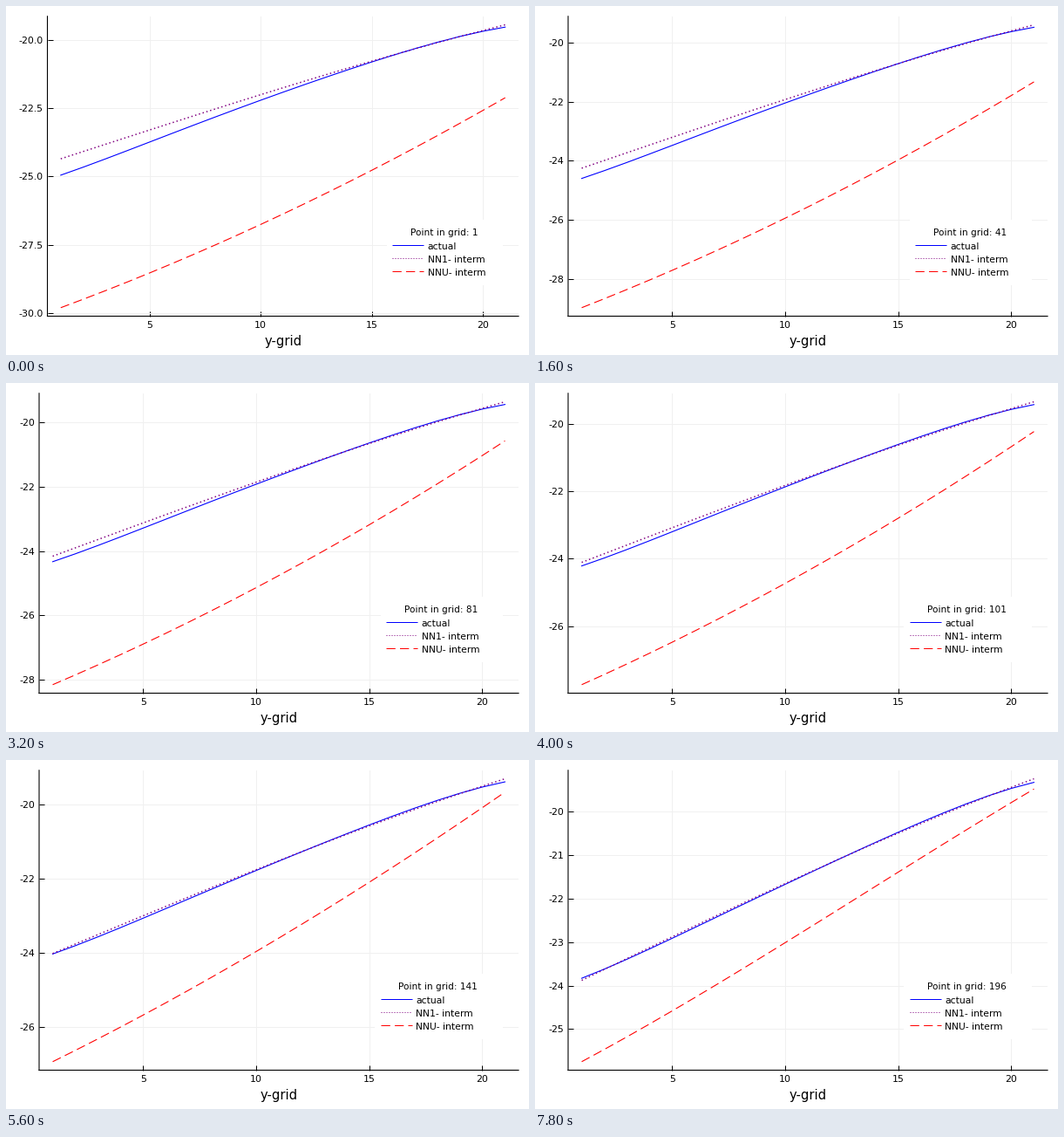
A matplotlib script for the animation above (8 s loop, 600x400 px).

```python
import numpy as np
import matplotlib.pyplot as plt
from matplotlib.animation import FuncAnimation
from matplotlib.patches import Rectangle

W, H, DPI = 600, 400, 100
PX = 72 / DPI                       # one pixel in points
TOP, BOTTOM, RIGHT = 11.8, 355.5, 588
FRAMES, INTERVAL, STEP = 40, 200, 5
GRID = np.arange(1, 22)

plt.rcParams.update({"font.family": "DejaVu Sans", "font.size": 11 * PX,
                     "axes.unicode_minus": False})


def bow(u, start, end, bend):
    """Straight line from start to end, bent between its fixed ends."""
    return start + (end - start) * u + u * (1 - u) * bend


# Each curve takes u = 0..1 along the grid and s = 0..1 through the loop.
def actual(u, s):
    ease, v = 1 - np.exp(-1.2 * s), u - 0.5
    bend = 1.31 - ease + 1.5 * v + 0.73 * v**2 + 4.3 * v**3
    return bow(u, -24.95 + 1.6 * ease, -19.52 + 0.193 * s, bend)


def nn1(u, s):
    return bow(u, -24.35 + 0.47 * s, -19.435 + 0.19 * s, 0.38 + 0.42 * u)


def nnu(u, s):
    late = s**3.3
    start = -29.81 + s * (4.06 - 0.55 * late * (1 - s))
    end = -22.11 + s * (3.81 - 1.18 * late)
    return bow(u, start, end, -1.66 + 1.36 * late + 0.8 * (u - 0.5) * late**2)


def dashes(width, on, off):
    return (0, (on / width, off / width))


# name, colour, curve, chart width and dash, legend width and dash
SERIES = [
    ("actual", "blue", actual, 1.1, "-", 1.0, "-"),
    ("NN1- interm", "purple", nn1, 1.5, dashes(1.5, 1.5, 3), 1.0, dashes(1, 1, 2)),
    ("NNU- interm", "red", nnu, 1.1, dashes(1.1, 10.3, 5.2),
     1.0, dashes(1, 10.3, 5.2)),
]

fig = plt.figure(figsize=(W / DPI, H / DPI), dpi=DPI, facecolor="white")
ax = fig.add_axes([0.1, 0.1, 0.8, 0.8])
over = fig.add_axes([0, 0, 1, 1])
over.set(xlim=(0, W), ylim=(H, 0))
over.axis("off")

ax.spines[["top", "right"]].set_visible(False)
for side in ("left", "bottom"):
    ax.spines[side].set(linewidth=1.1 * PX, snap=False)
ax.set_axisbelow(True)
ax.grid(color="#f0f0f0", linewidth=PX)
ax.tick_params(direction="in", length=6 * PX, width=PX, pad=4.7 * PX)
ax.tick_params(axis="x", pad=5.3 * PX)
ax.set_xlim(0.4, 21.6)
ax.set_xticks([5, 10, 15, 20])

box = over.add_patch(Rectangle((0, 244.5), 1, 75.5, color="white", linewidth=0))
title = over.text(541, 263.3, "", ha="right", fontsize=10.5 * PX)
xlabel = over.text(0, 388.7, "y-grid", ha="center", fontsize=14.8 * PX)
lines, keys, names = [], [], []
for row, (name, color, _, w, dash, kw, kdash) in enumerate(SERIES):
    y = 274 + 15 * row
    lines.append(ax.plot([], [], color=color, lw=w * PX, ls=dash,
                         dash_capstyle="butt")[0])
    keys.append(over.plot([], [], color=color, lw=kw * PX, ls=kdash,
                          dash_capstyle="butt", solid_capstyle="butt")[0])
    names.append(over.text(0, y + 4.6, name, fontsize=10.75 * PX))


def update(i):
    u, s = (GRID - 1) / 20, i / (FRAMES - 1)
    data = [curve(u, s) for _, _, curve, *_ in SERIES]
    low, high = np.min(data), np.max(data)
    pad = 0.03 * (high - low)
    low, high = low - pad, high + pad

    # the tick step tightens as -30 and then -27 leave the view
    step = 2.5 if low <= -30 else 2 if low <= -27 else 1
    left = 47.5 if step == 2.5 else 38
    ticks = np.arange(np.ceil(low / step) * step, high, step)
    form = "{:.1f}" if step == 2.5 else "{:.0f}"
    ax.set_position([left / W, 1 - BOTTOM / H,
                     (RIGHT - left) / W, (BOTTOM - TOP) / H])
    ax.set_yticks(ticks, [form.format(t) for t in ticks])
    ax.set_ylim(low, high)
    xlabel.set_x((left + RIGHT) / 2)

    point = 1 + STEP * i
    start = 443 - 6.75 * (len(str(point)) - 1)
    box.set_x(start - 6.5)
    box.set_width(570 - start + 6.5)
    title.set_text(f"Point in grid: {point}")
    for row in range(len(SERIES)):
        lines[row].set_data(GRID, data[row])
        keys[row].set_data([start, start + 36], [274 + 15 * row] * 2)
        names[row].set_x(start + 40.5)
    return lines


anim = FuncAnimation(fig, update, frames=FRAMES, interval=INTERVAL,
                     init_func=lambda: update(0), repeat=True,
                     repeat_delay=0, blit=False)
plt.show()
```
